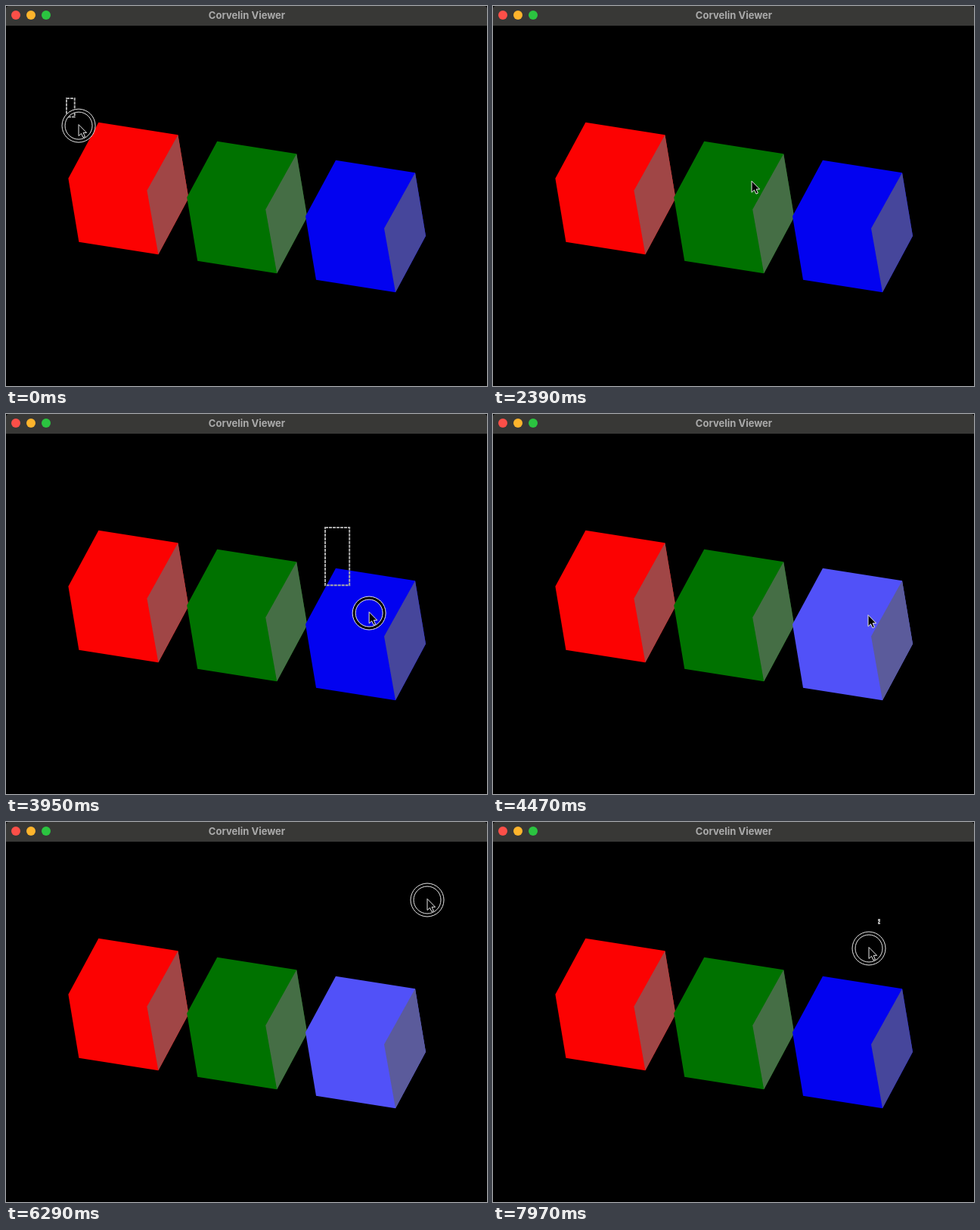
Animation of 636 by 502 pixels, one loop 7.99 s. Source, as an HTML page with a canvas:

```html
<!DOCTYPE html>
<html lang="en">
<head>
<meta charset="utf-8">
<title>Corvelin Viewer</title>
<style>
  html, body { margin: 0; width: 636px; height: 502px; overflow: hidden; background: #000; }
  canvas { display: block; }
</style>
</head>
<body>
<canvas id="stage" width="636" height="502"></canvas>
<script>
const ctx = document.getElementById('stage').getContext('2d');
const LOOP = 7990;
const LAG = 100; // the selection box trails the pointer
const PAUSE = [140, 1690];
const LIGHT = '#e8e8e8';

// key points of the pointer: time, x, y
const path = [
  [-450, 80, 122], [0, 96, 158], [140, 112, 188],
  [1000, 302, 146], [1500, 334, 242], [2200, 334, 242], [3210, 421, 143],
  [3600, 422, 150], [3850, 454, 226], [3950, 480, 263], [4150, 496, 267],
  [5030, 496, 267], [5900, 557, 103], [6500, 557, 103],
  [7700, 510, 129], [7870, 511, 134], [7970, 497, 167]
];

// mouse button held down, from and to
const presses = [[-450, 1000], [1000, 2200], [3600, 4400], [6200, 6420], [7700, LOOP]];

const cubes = [
  { color: [252, 2, 2], lit: [1690, 2200] },
  { color: [0, 114, 0], lit: [0, 0] },
  { color: [2, 2, 240], lit: [4400, 6420] }
];

const within = (t, [from, to]) => t >= from && t < to;
const shade = (color, scale, base) => `rgb(${color.map(c => Math.min(255, c * scale + base)).join()})`;

function slope(i, k) {
  const a = path[i], b = path[i + 1];
  return a && b ? (b[k] - a[k]) / (b[0] - a[0]) : 0;
}

// smooth path without overshoot
function tangent(i, k) {
  const a = slope(i - 1, k), b = slope(i, k);
  return a * b > 0 ? 2 * a * b / (a + b) : 0;
}

function pointer(t) {
  let i = 0;
  while (i < path.length - 2 && t >= path[i + 1][0]) i++;
  const a = path[i], b = path[i + 1], h = b[0] - a[0];
  const u = Math.max(0, Math.min(1, (t - a[0]) / h)), v = 1 - u;
  return [1, 2].map(k =>
    a[k] * (1 + 2 * u) * v * v + b[k] * u * u * (3 - 2 * u) +
    h * u * v * (tangent(i, k) * v - tangent(i + 1, k) * u));
}

function poly(points, fill) {
  ctx.beginPath();
  points.forEach(p => ctx.lineTo(p[0], p[1]));
  ctx.closePath();
  ctx.fillStyle = fill;
  ctx.fill();
}

function circle(x, y, r) {
  ctx.beginPath();
  ctx.arc(x, y, r, 0, 2 * Math.PI);
}

function ring(x, y, r, color, width) {
  circle(x, y, r);
  ctx.strokeStyle = color;
  ctx.lineWidth = width;
  ctx.stroke();
}

function drawWindow() {
  ctx.fillStyle = '#000';
  ctx.fillRect(0, 0, 636, 502);
  ctx.beginPath();
  ctx.roundRect(0, 0, 636, 26, [4, 4, 0, 0]);
  ctx.fillStyle = '#383836';
  ctx.fill();
  ['#fc4f48', '#fdb42c', '#2bc440'].forEach((color, i) => {
    circle(13 + 20 * i, 12, 6);
    ctx.fillStyle = color;
    ctx.fill();
  });
  ctx.font = '700 13px Inter, sans-serif';
  ctx.textAlign = 'center';
  ctx.fillStyle = '#aaaaaa';
  ctx.fillText('Corvelin Viewer', 318.5, 16.5);
}

function drawCube({ color, lit }, i, t) {
  const on = within(t, lit);
  const face = on ? shade(color, 0.7, 80) : shade(color, 1, 0);
  const side = on ? shade(color, 0.27, 90) : shade(color, 0.36, 69);
  ctx.save();
  ctx.translate(82.4 + 156.8 * i, 153.7 + 25 * i);
  poly([[40, 0], [145, 16.5], [159, 100], [119, 174.5], [14, 158], [0, 74]], face);
  poly([[145, 16.5], [159, 100], [119, 174.5], [104, 90]], side);
  ctx.restore();
}

function drawBox(from, t) {
  const [x0, y0] = pointer(from);
  const [x, y] = pointer(t - LAG);
  const w = x - x0, h = y - y0;
  if (t - LAG < from || Math.abs(w) + Math.abs(h) < 2) return;
  ctx.strokeStyle = '#aaaaaa';
  ctx.lineWidth = 2;
  ctx.setLineDash([4, 1]);
  ctx.strokeRect(x0, y0, w, h);
  ctx.setLineDash([]);
}

function drawPointer(x, y, pressed) {
  if (pressed) {
    ring(x, y, 20, '#000', 4);
    ring(x, y, 22, LIGHT, 1);
    ring(x, y, 18, LIGHT, 1);
  }
  ctx.save();
  ctx.translate(x, y - 1.5);
  poly([[0, 0], [0, 15], [3.5, 11.8], [5.9, 17], [8.4, 15.9], [6.1, 10.8], [10.6, 10.8]], '#000');
  ctx.strokeStyle = LIGHT;
  ctx.lineWidth = 1;
  ctx.stroke();
  ctx.restore();
}

function draw(time) {
  const t = within(time, PAUSE) ? PAUSE[0] : time;
  const press = presses.find(p => within(t, p));
  drawWindow();
  cubes.forEach((cube, i) => drawCube(cube, i, t));
  if (press) drawBox(press[0], t);
  drawPointer(...pointer(t), press);
}

const start = performance.now();
function tick() {
  draw((performance.now() - start) % LOOP);
  requestAnimationFrame(tick);
}
tick();
</script>
</body>
</html>
```
